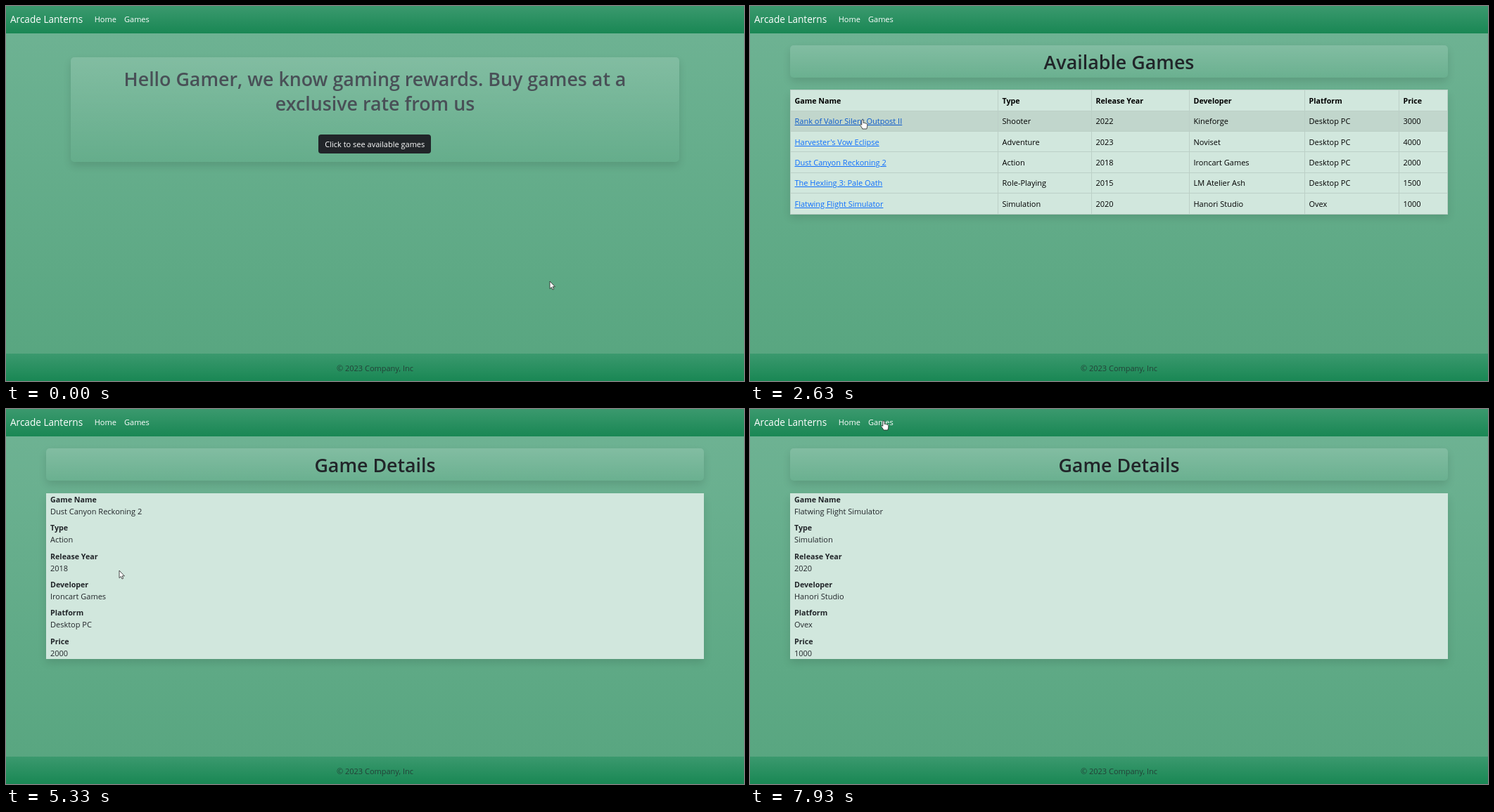
Write an HTML page that moves like this. It is 1049 by 534 pixels and loops after 8000 ms.

```html
<!DOCTYPE html>
<html lang="en">
<head>
<meta charset="utf-8">
<title>Game shop</title>
<style>
html, body { margin: 0; width: 100%; height: 100%; overflow: hidden; }
body { position: relative; background: linear-gradient(#6fb394, #57a57f); font: 11px "Open Sans", "Noto Sans", sans-serif; color: #212529; }
div, span, svg { position: absolute; }
span { line-height: 0; white-space: pre; }
.bar { left: 0; width: 100%; height: 39px; background: linear-gradient(#3b996e, #198754); }
.card { border-radius: 5px; background: linear-gradient(#ffffff26, #fff0); }
.card, .panel { box-shadow: 0 5.8px 11.5px #0000001f; }
.panel { background: #d1e7dd; box-sizing: border-box; }
.line { background: #bcd0c7; }
.row.hot { background: #c1d6cc; }
.button { background: #212529; border-radius: 4px; }
.button.hot { background: #424649; }
.mid { transform: translateX(-50%); }
.h1 { font-size: 26.8px; font-weight: 600; }
.soft { color: #495057; }
.b { font-size: 10.7px; font-weight: 700; }
.white { color: #fff; }
.brand { font-size: 13.6px; }
.foot { color: #212529bf; }
.cell { color: #000; }
.link { color: #0d6efd; text-decoration: underline; }
.hot.link { color: #0a58ca; }
svg { left: 0; top: 0; overflow: visible; }
</style>
</head>
<body>
<div id="page"></div>
<div id="frame"></div>
<svg id="cursor" width="1" height="1"><path stroke="#222" stroke-width=".8" fill="#fff" stroke-linejoin="round"/></svg>
<script>
const $ = id => document.getElementById(id);
const heads = ['Game Name', 'Type', 'Release Year', 'Developer', 'Platform', 'Price'];
const games = [
  ['Rank of Valor Silent Outpost II', 'Shooter', 2022, 'Kineforge', 'Desktop PC', 3000],
  ["Harvester's Vow Eclipse", 'Adventure', 2023, 'Noviset', 'Desktop PC', 4000],
  ['Dust Canyon Reckoning 2', 'Action', 2018, 'Ironcart Games', 'Desktop PC', 2000],
  ['The Hexling 3: Pale Oath', 'Role-Playing', 2015, 'LM Atelier Ash', 'Desktop PC', 1500],
  ['Flatwing Flight Simulator', 'Simulation', 2020, 'Hanori Studio', 'Ovex', 1000]
];
const columns = [57, 352, 485, 624, 788, 922];
const rowTop = 119.6, rowHeight = 29.4;

// y is the text baseline
const text = (x, y, s, cls = '') =>
  `<span class="${cls}" style="left:${x}px;top:calc(${y}px - .388em)">${s}</span>`;
const box = (x, y, w, h, cls) =>
  `<div class="${cls}" style="left:${x}px;top:${y}px;width:${w}px;height:${h}px"></div>`;
const title = s => box(57, 56, 934.5, 46, 'card') + text(524.5, 90.5, s, 'h1 mid');

function home(hot) {
  return box(92, 73, 865, 148.5, 'card') +
    text(524.5, 114.5, 'Hello Gamer, we know gaming rewards. Buy games at a', 'h1 soft mid') +
    text(524.5, 149, 'exclusive rate from us', 'h1 soft mid') +
    box(444, 183, 160, 27, 'button ' + (hot.button ? 'hot' : '')) +
    text(524.3, 201, 'Click to see available games', 'white mid');
}

function list(hot) {
  let html = title('Available Games') + box(57, rowTop, 934.5, 176.8, 'panel');
  if (hot.row >= 0) html += box(57, rowTop + rowHeight * (hot.row + 1), 934.5, rowHeight, 'row hot');
  for (let i = 0; i < 7; i++) html += box(57, Math.round(rowTop + rowHeight * i - .3), 934.5, 1, 'line');
  for (const x of [...columns, 991]) html += box(x, rowTop, 1, 176.8, 'line');
  columns.forEach((x, c) => {
    html += text(x + 6.5, 139, heads[c], 'b cell');
    games.forEach((game, r) => {
      const cls = c ? 'cell' : 'link' + (hot.link && hot.row === r ? ' hot' : '');
      html += text(x + 6.5, 168.5 + rowHeight * r, game[c], cls);
    });
  });
  return html;
}

function details(game) {
  return title('Game Details') + box(57, 119.6, 934.5, 236.4, 'panel') +
    heads.map((head, i) => text(63, 133 + 40.35 * i, head, 'b') +
      text(63, 150.3 + 40.35 * i, game[i])).join('');
}

// start time, page: 'home', 'list' or index of a game
const visits = [[0, 'home'], [1660, 'list'], [2710, 0], [3880, 'list'], [5190, 2], [6270, 'list'], [6870, 4]];
// start, end, control point, end point
const moves = [
  [70, 850, 660, 219, 503, 186],
  [1850, 2560, 330, 185, 160, 162],
  [2950, 3460, 150, 130, 147, 80],
  [3530, 3740, 150, 25, 188, 20],
  [3950, 4320, 190, 140, 338, 203],
  [4390, 4900, 260, 215, 161, 230],
  [5450, 5920, 215, 60, 250, 25],
  [6040, 6180, 220, 12, 188, 20],
  [6330, 6800, 14, 221, 110, 281],
  [7050, 7660, 260, 200, 243, 75],
  [7730, 7930, 235, 30, 190, 17]
];

function pointer(t) {
  let x = 773, y = 392;
  for (const [from, to, cx, cy, ex, ey] of moves) {
    if (t < from) break;
    const u = Math.min(1, (t - from) / (to - from)), e = u * u * (3 - 2 * u), d = 1 - e;
    x = d * d * x + 2 * d * e * cx + e * e * ex;
    y = d * d * y + 2 * d * e * cy + e * e * ey;
  }
  return [x, y];
}

function hover(page, [x, y]) {
  const row = Math.floor((y - rowTop) / rowHeight) - 1;
  const inTable = page === 'list' && x > 57 && x < 991 && row >= 0 && row < 5;
  return {
    row: inTable ? row : -1,
    link: inTable && x < 195 && Math.abs(y - 164 - rowHeight * row) < 8,
    button: page === 'home' && x > 444 && x < 604 && y > 183 && y < 210,
    nav: y > 9 && y < 30 && x > 120 && x < 206
  };
}

const arrow = 'M0 0V10.6L2.4 8.4 4 12 5.7 11.2 4.1 7.8H7.4Z';
const hand = 'M-1.2 1A1.2 1.2 0 0 1 1.2 1V4.6C2 4 3 4.2 3.2 5 4 4.6 5 4.8 5.2 5.6 6.2 5.4 6.8 6 6.8 7V9C6.8 10.5 6 11.2 5.8 13H-.2C-.6 11-3 9-3.4 7.4-3.4 6.4-2.4 6-1.2 7.4Z';
const lag = 60; // highlights trail the pointer
let shown;

function draw(now) {
  const t = now % 8000;
  const page = visits.filter(v => v[0] <= t).pop()[1];
  const [x, y] = pointer(t);
  const over = hover(page, [x, y]), hot = hover(page, pointer(t - lag));
  const html = page === 'home' ? home(hot) : page === 'list' ? list(hot) : details(games[page]);
  if (html !== shown) $('page').innerHTML = shown = html;
  $('cursor').style.transform = `translate(${x}px,${y}px)`;
  $('cursor').firstChild.setAttribute('d', over.link || over.button || over.nav ? hand : arrow);
  requestAnimationFrame(draw);
}

$('frame').style.cssText = 'left:0;top:0;width:1049px;height:534px';
$('frame').innerHTML = '<div class="bar" style="top:0"></div><div class="bar" style="top:495px"></div>' +
  text(6, 24, 'Arcade Lanterns', 'brand white') + text(125.7, 23, 'Home', 'white') +
  text(168, 23, 'Games', 'white') + text(524.5, 520.5, '© 2023 Company, Inc', 'foot mid');
requestAnimationFrame(draw);
</script>
</body>
</html>
```
